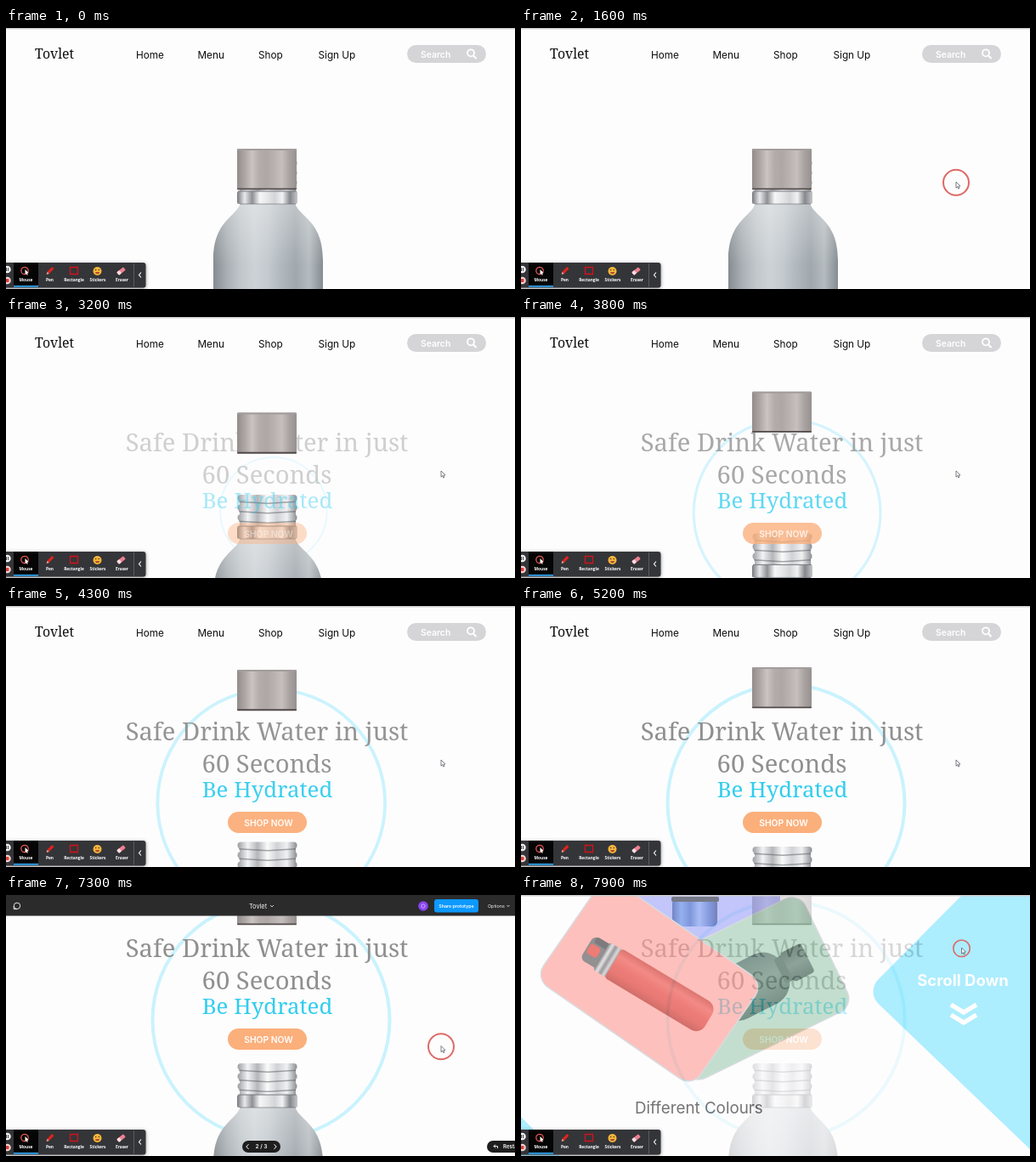
An HTML page with a canvas for the animation above (8000 ms loop, 599 px wide and 307 px high).

```html
<!DOCTYPE html>
<html lang="en">
<head>
<meta charset="utf-8">
<title>Tovlet</title>
<style>
  html, body { margin: 0; width: 100%; height: 100%; overflow: hidden; background: #fefdfe; }
  canvas { display: block; width: 599px; height: 307px; }
</style>
</head>
<body>
<canvas id="stage" width="599" height="307"></canvas>
<script>
const W = 599, H = 307, LOOP = 8000, STEP = 100;
const BRAND = 'Tovlet';
const SERIF = '"Noto Serif", serif', SANS = 'Inter, sans-serif';
const stage = document.getElementById('stage').getContext('2d');
let ctx = stage;

const clamp = v => Math.max(0, Math.min(1, v));
const mix = (a, b, p) => a + (b - a) * p;
const span = (t, a, b) => clamp((t - a) / (b - a));
const easeOut = p => 1 - (1 - p) ** 3;

// cubic-bezier(.42, 0, .58, 1)
function easeInOut(x) {
  let lo = 0, hi = 1;
  for (let i = 0; i < 20; i++) {
    const u = (lo + hi) / 2, v = 1 - u;
    if (3 * v * v * u * 0.42 + 3 * v * u * u * 0.58 + u ** 3 < x) lo = u; else hi = u;
  }
  return lo * lo * (3 - 2 * lo);
}

function group(alpha, fn, x = 0, y = 0, deg = 0) {
  if (alpha <= 0) return;
  ctx.save();
  ctx.globalAlpha *= alpha;
  ctx.translate(x, y);
  ctx.rotate(deg * Math.PI / 180);
  fn();
  ctx.restore();
}
function box(x, y, w, h, r, fill, stroke, lw = 1) {
  ctx.beginPath();
  ctx.roundRect(x, y, w, h, r);
  paint(fill, stroke, lw);
}
function disc(x, y, r, fill, stroke, lw = 1) {
  ctx.beginPath();
  ctx.arc(x, y, Math.max(0, r), 0, Math.PI * 2);
  paint(fill, stroke, lw);
}
function poly(pts, fill, stroke, lw = 1) {
  ctx.beginPath();
  for (let i = 0; i < pts.length; i += 2) ctx.lineTo(pts[i], pts[i + 1]);
  if (fill) ctx.closePath();
  paint(fill, stroke, lw);
}
function paint(fill, stroke, lw) {
  if (fill) { ctx.fillStyle = fill; ctx.fill(); }
  if (stroke) { ctx.strokeStyle = stroke; ctx.lineWidth = lw; ctx.stroke(); }
}
function text(s, x, y, font, color, align = 'left') {
  ctx.font = font;
  ctx.fillStyle = color;
  ctx.textAlign = align;
  ctx.fillText(s, x, y);
}
function ramp(x0, y0, x1, y1, colors) {
  const g = ctx.createLinearGradient(x0, y0, x1, y1);
  colors.forEach((c, i) => g.addColorStop(i / (colors.length - 1), c));
  return g;
}
const across = (a, b, ...colors) => ramp(a, 0, b, 0, colors);
const down = (a, b, ...colors) => ramp(0, a, 0, b, colors);

function header() {
  text(BRAND, 34, 36, '15.8px ' + SERIF, '#111');
  const items = [['Home', 153], ['Menu', 225.5], ['Shop', 297], ['Sign Up', 367.5]];
  for (const [s, x] of items) text(s, x, 36, '11.75px ' + SANS, '#0c0c0c');
  box(472, 20, 93, 21, 10.5, '#d5d4d7');
  text('Search', 488, 34.5, '600 10.4px ' + SANS, '#fff');
  disc(547, 29.3, 4, null, '#fff', 1.8);
  poly([550, 32.5, 553.5, 36], null, '#fff', 2.2);
}

function flask(y) {
  const steel = across(273, 342, '#a0a1a5', '#f2f3f4', '#b4b6b9', '#fafafa', '#d0d2d5', '#f0f0f2', '#8f9195');
  // shoulders and body
  ctx.beginPath();
  ctx.moveTo(276, y + 50);
  ctx.bezierCurveTo(273, y + 67, 244, y + 70, 244, y + 118);
  ctx.lineTo(244, y + 200);
  ctx.lineTo(373, y + 200);
  ctx.lineTo(373, y + 118);
  ctx.bezierCurveTo(373, y + 70, 343, y + 67, 340, y + 50);
  ctx.closePath();
  paint(across(244, 373, '#858b90', '#a9afb4', '#c0c6ca', '#cdd2d6', '#c3c9ce', '#b0b7bd', '#a0a7ad', '#b5bbbf', '#858c92'));
  paint(down(y + 52, y + 125, 'rgba(255,255,255,.32)', 'rgba(255,255,255,0)'));
  // threaded neck
  box(275, y + 2, 66, 36, 2, steel);
  for (let i = 0; i < 3; i++) {
    const r = y + i * 11.5;
    box(272.5, r, 70, 8, 4, steel);
    poly([274, r + 8.3, 308, r + 10.3, 341, r + 8.3], null, 'rgba(85,88,94,.5)', 1.5);
  }
  // collar
  box(272, y + 37, 71, 15, 2, across(272, 343, '#77797d', '#e8e9eb', '#8e9094', '#f6f6f7', '#e6e7e9', '#d2d4d6', '#f2f2f4', '#85878b', '#c5c6c9'));
  poly([273, y + 37, 342, y + 37], null, '#77797d', 1);
  poly([275, y + 52, 341, y + 52], null, 'rgba(95,100,106,.6)', 1);
}

function cap(y) {
  box(272, y, 70, 48, 1.5, across(272, 342, '#938c8b', '#aca5a4', '#c9c3c1', '#b3acab', '#aea7a6', '#b9b2b1', '#c5bfbe', '#aaa3a2', '#969090'));
  box(272, y, 70, 2, 1, '#a29d9c');
  box(272, y + 46.4, 70, 1.8, 1, '#524b4a');
}

function hero(p) {
  const big = '29.2px ' + SERIF;
  group(p, () => disc(mix(317, 312, p), mix(225, 232, p), mix(7, 139.5, p), null, '#c9f3fd', mix(0.5, 4, p)));
  flask(mix(155, 283, p));
  group(p, () => {
    text('Safe Drink Water in just', 307, 158, big, '#8f8f90', 'center');
    text('60 Seconds', 307, 195.5, big, '#8f8f90', 'center');
    text('Be Hydrated', 307.5, 224.5, '25.9px ' + SERIF, '#32cdee', 'center');
    box(261, 242, 93, 25, 12.5, '#fbaf7b');
    text('SHOP NOW', 309, 259, '600 10.3px ' + SANS, '#fff', 'center');
  });
  cap(mix(142, 72, p));
}

function card(w, x, y, deg, fill) {
  group(1, () => box(-w / 2, -74, w, 148, 18, fill, '#c3ccd0', 1.5), x, y, deg);
}

function blueFlask() {
  box(178, 4, 53, 33, 6, across(178, 231, '#2c48ac', '#5f8ae8', '#3c62c8', '#7f9cf2', '#4a6cd2', '#2a429c'));
  box(177, 2, 56, 6, 2, '#30384c');
  box(182, -6, 50, 6, 3, '#22262e');
}

function greenFlask() {
  box(-62, -32, 94, 64, 28, down(-32, 32, '#40655a', '#5d8270', '#365c4b'));
  box(24, -16, 14, 32, 3, '#3c5f50');
  box(34, -19, 27, 38, 4, down(-19, 19, '#345245', '#547666', '#34574a'));
}

function redFlask() {
  box(-102, -16, 26, 32, 6, '#5c585b');
  box(-98, -17, 22, 8, 3, '#3d393d');
  box(-100, -7, 14, 13, 4, '#e53a30');
  box(-82, -19, 18, 38, 3, across(-82, -64, '#4c494c', '#d8d6d8', '#6a676a', '#c8c6c8', '#4c494c'));
  box(-66, -20, 131, 40, [4, 12, 12, 4], down(-20, 20, '#cc2f27', '#ee5048', '#e63c34', '#dd352d', '#b9251e'));
}

function colours() {
  ctx.fillStyle = '#fefdfe';
  ctx.fillRect(0, 0, W, H);
  box(115, -80, 190, 150, 18, '#a4aaf8');
  blueFlask();
  card(212, 264, 110, -26, '#a5cfb6');
  group(1, greenFlask, 283, 101, -27);
  card(225, 151, 101, 34.7, '#ffa29b');
  group(1, redFlask, 165, 114, 31);
  ctx.beginPath();
  ctx.moveTo(521, -2);
  ctx.arcTo(406, 114, W, 299, 20);
  ctx.lineTo(W, 299);
  ctx.lineTo(W, -2);
  paint('#82e6ff');
  poly([0, 261, 0, H, 46, H], '#82e6ff');
  text('Scroll Down', 520, 106.5, '700 18.5px ' + SANS, '#fff', 'center');
  for (const y of [129, 141]) poly([506, y, 521, y + 9, 536, y], null, '#fff', 5.5);
  text('Different Colours', 134, 256.5, '18.8px ' + SANS, '#2d2d2f');
}

// The next page is composed once, then dissolved in as a single layer.
function layer(fn) {
  const c = document.createElement('canvas');
  c.width = W;
  c.height = H;
  ctx = c.getContext('2d');
  fn();
  ctx = stage;
  return c;
}

function playerBar() {
  const white = '#f4f4f4';
  box(0, 0, W, 24.5, 0, '#2b2b2c');
  disc(13, 12.8, 3.7, null, white, 0.9);
  poly([9.2, 13, 9.2, 16.6, 13, 16.6], null, white, 0.9);
  text(BRAND, 296.5, 15.7, '7.4px ' + SANS, white, 'center');
  poly([311, 12, 313, 14, 315, 12], null, white, 0.8);
  disc(491, 13, 5.8, '#8a43f0');
  disc(491, 13, 2.2, null, '#d9c3ff', 0.8);
  box(504, 5, 52, 15.5, 3, '#0d99ff');
  text('Share prototype', 530, 15, '600 5.3px ' + SANS, '#fff', 'center');
  text('Options', 567, 15, '5.4px ' + SANS, white);
  poly([589.5, 12, 591, 13.6, 592.5, 12], null, white, 0.8);
  box(278, 289, 45, 14, 7, '#1e1e1f');
  poly([285.5, 293.2, 282.8, 296, 285.5, 298.8], null, '#fff', 1);
  poly([315.5, 293.2, 318.2, 296, 315.5, 298.8], null, '#fff', 1);
  text('2 / 3', 300.5, 298.3, '600 6.6px ' + SANS, '#fff', 'center');
  box(566, 289, 50, 14, 7, '#1e1e1f');
  poly([576, 293.5, 574, 295.5, 576, 297.5], null, '#fff', 0.9);
  poly([574, 295.5, 578.5, 295.5, 578.5, 298], null, '#fff', 0.9);
  text('Restart', 585, 298.2, '600 6.2px ' + SANS, '#fff');
}

function arrow(x, y, k, fill, edge) {
  group(1, () => {
    ctx.scale(k, k);
    poly([0, 0, 0, 8, 1.8, 6.3, 3, 9, 4.3, 8.4, 3.1, 5.8, 5.5, 5.6], fill, edge, 0.8);
  }, x, y);
}

function toolbar() {
  ctx.save();
  ctx.shadowColor = 'rgba(0,0,0,.45)';
  ctx.shadowBlur = 4;
  ctx.shadowOffsetY = 1;
  box(-6, 276, 170.5, 29.5, 3, '#343538');
  ctx.restore();
  disc(1.5, 284, 4.3, '#f2f2f2');
  box(0, 282, 1, 4, 0, '#444');
  box(2, 282, 1, 4, 0, '#444');
  disc(1.5, 297, 4.3, '#f3d5d3');
  box(-0.5, 295, 4, 4, 1, '#dc3d36');
  box(9, 276, 29, 28, 0, '#050505');
  box(9, 302.8, 29, 2, 0, '#2a98e0');
  const labels = [['Mouse', 23.5], ['Pen', 51.5], ['Rectangle', 80], ['Stickers', 108], ['Eraser', 136.5]];
  for (const [s, x] of labels) text(s, x, 298.3, '700 4.8px "Open Sans", sans-serif', '#fff', 'center');
  disc(22, 285.5, 4.2, null, '#e2574f', 1.3);
  arrow(22.5, 284, 0.75, '#fff', null);
  group(1, () => {
    box(-2.5, -1.6, 8, 3.2, 0.5, '#e0231f');
    poly([-2.5, -1.6, -5.5, 0, -2.5, 1.6], '#f3a08f');
  }, 51.5, 286, -45);
  box(75.5, 281.5, 9, 8, 0, null, '#d3131a', 1.3);
  disc(107.5, 286, 5, '#f6b73c');
  disc(105.7, 284.5, 0.8, '#503418');
  disc(109.3, 284.5, 0.8, '#503418');
  ctx.beginPath();
  ctx.arc(107.5, 286.5, 2.7, 0.2, 2.9);
  paint('#a8422f');
  group(1, () => {
    box(-5, -2.2, 10, 4.4, 1, '#ef7f92');
    box(-5, -2.2, 4, 4.4, 1, '#f7dfe2');
  }, 135.5, 286, -38);
  box(150, 277, 0.8, 27.5, 0, '#67686b');
  poly([159, 287.5, 156.5, 290.5, 159, 293.5], null, '#fff', 1.1);
}

// pointer waypoints: time, x, y
const path = [
  [300, 478, 318], [900, 512, 181], [5550, 512, 181], [6000, 530.5, 16.5],
  [6450, 530.5, 16.5], [7000, 512, 177.5], [7450, 512, 177.5], [7850, 518.5, 62], [8000, 518.5, 62]
];
const clicks = [[1300, 1800], [5850, 6350], [7050, 7550], [7770, 8100]];

function pointer(t) {
  if (t < path[0][0]) return;
  const i = path.findIndex(k => k[0] > t);
  const [t0, x0, y0] = path[i - 1], [t1, x1, y1] = path[i];
  const p = easeInOut(span(t, t0, t1));
  const x = mix(x0, x1, p), y = mix(y0, y1, p);
  for (const [a, b] of clicks) {
    if (t >= a && t < b) {
      const g = span(t, a, a + 200);
      disc(x, y + 0.8, 15 * g, null, '#dd6a66', mix(0.8, 2, g));
    }
  }
  arrow(x, y, 0.9, '#fff', '#4a4d55');
}

function draw(t) {
  ctx.fillStyle = '#fefdfe';
  ctx.fillRect(0, 0, W, H);
  const scroll = 85 * easeOut(span(t, 5400, 6000));
  group(1, () => {
    header();
    hero(easeInOut(span(t, 1950, 4700)));
  }, 0, -scroll);
  group(easeInOut(span(t, 7400, 8240)), () => ctx.drawImage(nextPage, 0, 0));
  box(0, 0, W, 1.6, 0, '#cdccd0');
  group(span(t, 6400, 6600) * (1 - span(t, 7500, 7700)), playerBar);
  toolbar();
  pointer(t);
}

const nextPage = layer(colours);

function frame() {
  draw(Math.floor(performance.now() % LOOP / STEP) * STEP);
  requestAnimationFrame(frame);
}
frame();
</script>
</body>
</html>
```
